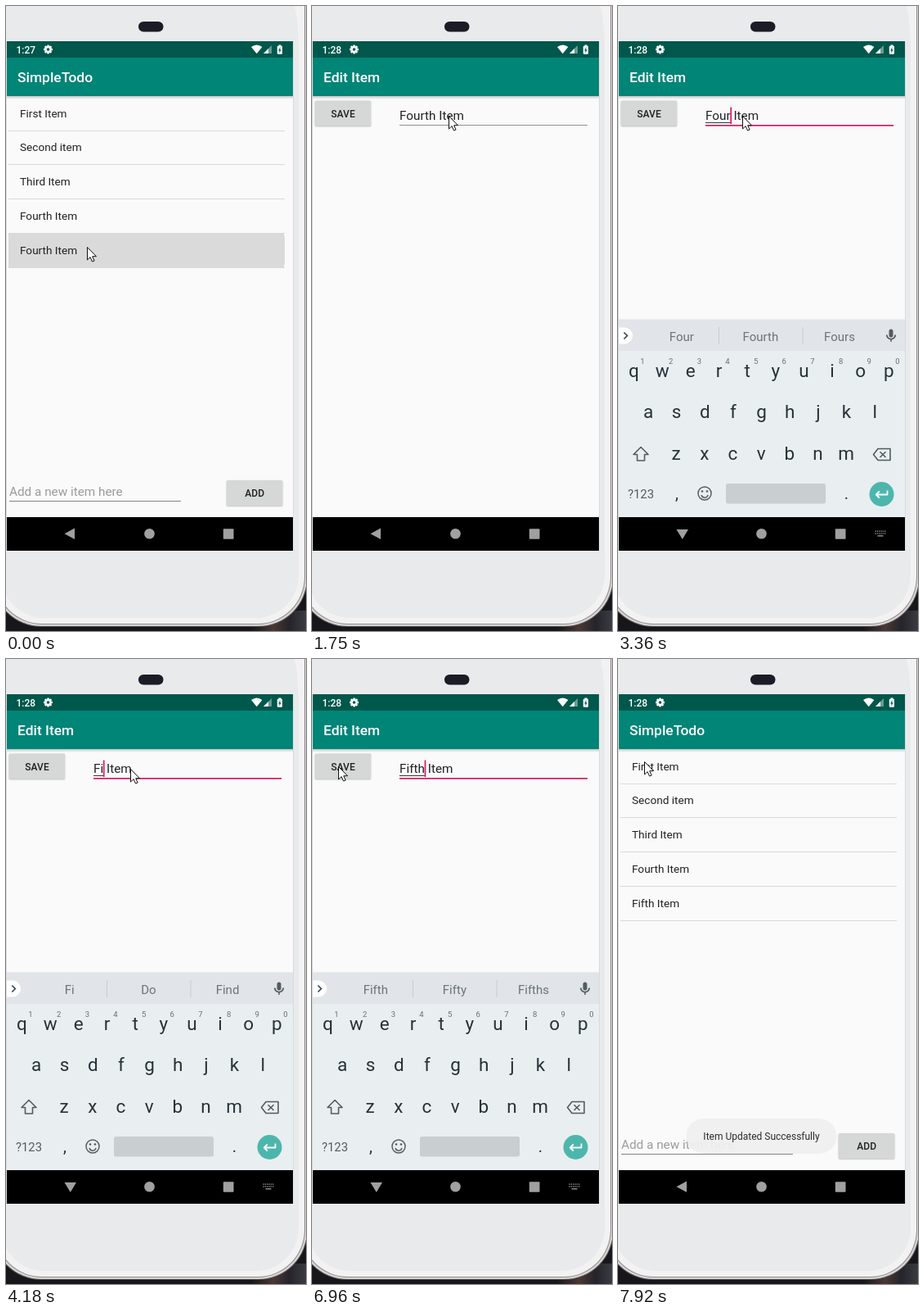
An HTML page with a canvas for the animation above (8 s loop, 367x763 px).

```html
<!DOCTYPE html>
<html lang="en">
<head>
<meta charset="utf-8">
<title>Todo app demo</title>
<style>
html, body { margin: 0; width: 100%; height: 100%; overflow: hidden; background: #e9eaec; }
canvas { display: block; width: 367px; height: 763px; }
</style>
</head>
<body>
<canvas id="stage"></canvas>
<script>
const W = 367, H = 763, LOOP = 8000;
const canvas = document.getElementById('stage');
const ratio = window.devicePixelRatio || 1;
canvas.width = Math.round(W * ratio);
canvas.height = Math.round(H * ratio);
const ctx = canvas.getContext('2d');
ctx.scale(ratio, ratio);

const PINK = '#d81b60';

// Each track is a list of [start, ...values]; a value holds until the next start.
const pointerTrack = [
  [0, 99.5, 294], [1500, 126, 235], [1630, 155, 166], [1750, 167.5, 134], [1900, 155, 134],
  [2050, 152.5, 134], [5310, 137, 139], [5430, 106, 140], [5550, 70, 138], [5680, 42, 134],
  [5800, 32.5, 131], [7920, 32.5, 125]
];
// entering offset, top of the revealed part, shift of the list, dimming
const openTrack = [
  [0, 25, 700, 0, 0], [700, 25, 560, 0, .02], [820, 24, 420, -1, .04],
  [960, 12, 120, -8, .1], [1080, 1, 43, -8, .1], [1230, 0, 43, -8, .1]
];
const closeTrack = [[7230, -8, .1], [7380, -3, .04], [7500, 0, 0]];
// offset, opacity
const keyboardTrack = [[0, 0, 0], [2850, 27, .5], [2980, 7, .85], [3120, 0, 1], [7380, 34, .4], [7500, 0, 0]];
const wordTrack = [
  [0, 'Fourth', 'Fourths', 'Fourth-quarter'], [3240, 'Fourt', 'Fourth', 'Fourths'],
  [3360, 'Four', 'Fourth', 'Fours'], [3510, 'Fou', 'Four', 'Foul'], [3630, 'Fo', 'For', 'Food'],
  [3760, 'F', 'For', 'Fun'], [4180, 'Fi', 'Do', 'Find'], [4300, 'Fif', 'Fifth', 'Fit'],
  [4730, 'Fifth', 'Fifty', 'Fifths']
];

function at(track, t) {
  let current = track[0];
  for (const entry of track) if (entry[0] <= t) current = entry;
  return current.slice(1);
}

function rect(x, y, w, h, color) {
  ctx.fillStyle = color;
  ctx.fillRect(x, y, w, h);
}

function round(x, y, w, h, r, color) {
  ctx.fillStyle = color;
  ctx.beginPath();
  ctx.roundRect(x, y, w, h, r);
  ctx.fill();
}

function disc(x, y, r, color) {
  ctx.fillStyle = color;
  ctx.beginPath();
  ctx.arc(x, y, r, 0, Math.PI * 2);
  ctx.fill();
}

function trace(points, closed) {
  ctx.beginPath();
  points.forEach(([x, y]) => ctx.lineTo(x, y));
  if (closed) ctx.closePath();
}

function poly(points, color) {
  trace(points, true);
  ctx.fillStyle = color;
  ctx.fill();
}

function line(points, color, width = 1, closed = false) {
  trace(points, closed);
  ctx.strokeStyle = color;
  ctx.lineWidth = width;
  ctx.stroke();
}

function text(str, x, y, size, color, weight = 400, align = 'left') {
  ctx.font = `${weight} ${size}px Roboto, sans-serif`;
  ctx.textAlign = align;
  ctx.fillStyle = color;
  ctx.fillText(str, x, y);
}

function layer(draw) {
  ctx.save();
  draw();
  ctx.restore();
}

function clip(x, y, w, h) {
  ctx.beginPath();
  ctx.rect(x, y, w, h);
  ctx.clip();
}

function phone() {
  rect(0, 0, W, H, '#17171b');
  const glow = ctx.createLinearGradient(300, 0, W, 0);
  glow.addColorStop(0, '#17171b');
  glow.addColorStop(.4, '#4a3735');
  glow.addColorStop(.7, '#25242a');
  glow.addColorStop(1, '#3a3c42');
  rect(300, 738, 67, 25, glow);
  const rings = [[0, '#514c4d'], [1, '#d8d5d5'], [3, '#938e8f'], [4, '#f3f2f2'], [11, '#e9eaec']];
  for (const [inset, color] of rings) {
    round(-17 + inset, -80, 386 - inset * 2, 838 - inset, 60 - inset * .7, color);
  }
  ctx.fillStyle = '#f3f2f2';
  ctx.beginPath();
  ctx.moveTo(353, 0);
  ctx.quadraticCurveTo(357, 16, 358, 48);
  ctx.lineTo(360, 48);
  ctx.lineTo(360, 0);
  ctx.fill();
  round(162, 19, 30.5, 12.5, 6.2, '#1b1d26');
  rect(0, 43, 352, 622, '#d9dbdc');
}

function toolbar(title) {
  rect(1, 43, 350, 20, '#00574b');
  rect(1, 63, 350, 47, '#008577');
  const shade = ctx.createLinearGradient(0, 110, 0, 114);
  shade.addColorStop(0, 'rgba(0,0,0,.2)');
  shade.addColorStop(1, 'rgba(0,0,0,0)');
  rect(1, 110, 350, 4, shade);
  text(title, 14, 93, 17.4, '#fff', 500);
}

function button(label, x, y) {
  layer(() => {
    ctx.shadowColor = 'rgba(0,0,0,.25)';
    ctx.shadowBlur = 1.5 * ratio;
    ctx.shadowOffsetY = .7 * ratio;
    round(x, y, 68.5, 31, 1.5, '#d6d7d7');
  });
  text(label, x + 34.4, y + 20, 12, '#202020', 500, 'center');
}

function listScreen(lastItem, { shift = 0, dim = 0, pressed = false, resized = false }) {
  layer(() => {
    clip(1, 43, 350, 581);
    rect(1, 43, 350, 581, '#fafafa');
    ctx.translate(0, shift);
    toolbar('SimpleTodo');
    if (pressed) {
      rect(3, 278, 337, 41, '#dadada');
      round(330, 278, 11, 41, 5, '#dadada');
    }
    ['First Item', 'Second item', 'Third Item', 'Fourth Item', lastItem].forEach((item, i) => {
      const bottom = Math.round(151.6 + i * 41.8);
      text(item, 17, bottom - 16, 13.6, '#222');
      rect(3, bottom, 338, 1, '#d9d9d9');
    });
    const inputY = resized ? -240 : 0;
    text('Add a new item here', 4, 598 + inputY, 15.3, '#9b9b9b');
    rect(4, 604 + inputY, 210, 1, '#858585');
    button('ADD', 269.8, 579 + inputY);
    ctx.translate(0, -shift);
    rect(1, 43, 350, 581, `rgba(0,0,0,${dim})`);
  });
}

function editScreen(t, offset, top) {
  const focused = t >= 2300;
  layer(() => {
    clip(1, Math.max(43, top), 350, 622);
    ctx.translate(0, offset);
    rect(1, 43, 350, 581, '#fafafa');
    toolbar('Edit Item');
    button('SAVE', 3.6, 115.5);
    const [word] = at(wordTrack, t);
    text(word + ' Item', 107, 139, 15.3, '#222');
    const end = 107 + ctx.measureText(word).width;
    rect(107, 145, 230, focused ? 1.7 : .9, focused ? PINK : '#858585');
    if (t >= 2570) {
      rect(107, 142, end - 107, 1, '#333');
      rect(end - .3, 123.5, 1.7, 20.5, PINK);
    }
    if (t >= 2570 && t < 3240) {
      disc(end, 155, 8.5, PINK);
      poly([[end, 146], [end + 6, 149], [end - 6, 149]], PINK);
    }
  });
}

function statusBar(clock) {
  text(clock, 12.5, 57.5, 12, '#fff', 500);
  ctx.save();
  ctx.translate(51.5, 53);
  for (let i = 0; i < 4; i++) {
    rect(-1.3, -5.4, 2.6, 10.8, '#fff');
    ctx.rotate(Math.PI / 4);
  }
  disc(0, 0, 4.2, '#fff');
  disc(0, 0, 1.8, '#00574b');
  ctx.restore();
  ctx.fillStyle = '#fff';
  ctx.beginPath();
  ctx.moveTo(306.7, 58.2);
  ctx.lineTo(300, 50);
  ctx.quadraticCurveTo(306.7, 45, 313.4, 50);
  ctx.fill();
  poly([[315, 58], [325, 58], [325, 48]], '#6b9b94');
  poly([[315, 58], [321, 58], [321, 52]], '#fff');
  rect(333.5, 47.5, 3, 2, '#fff');
  round(331.8, 48.8, 6.2, 10, 1, '#fff');
  poly([[335.5, 50], [333.2, 54.4], [334.6, 54.4], [334.2, 57.5], [336.7, 53.2], [335.2, 53.2]], '#00574b');
}

function navBar(typing) {
  const gray = '#a0a0a0';
  if (typing) {
    poly([[71.5, 639], [86, 639], [78.8, 651]], gray);
    for (let row = 0; row < 2; row++) {
      for (let col = 0; col < 6; col++) rect(314.5 + col * 2.3, 640.5 + row * 2.8, 1.2, 1.4, gray);
    }
    rect(317.5, 646.2, 7, 1.3, gray);
  } else {
    poly([[71.5, 644.3], [84, 637.5], [84, 651]], gray);
  }
  disc(175.5, 644.3, 6.3, gray);
  round(265.8, 638.2, 12.7, 12.5, 1, gray);
}

function keyRow(letters, x, y) {
  [...letters].forEach((letter, i) => text(letter, x + i * 34.65, y, 22.5, '#263238', 400, 'center'));
}

function keyIcons() {
  const gray = '#525c61';
  ctx.lineJoin = 'round';
  line([[28, 538.5], [37, 547.5], [32.5, 547.5], [32.5, 555], [23.5, 555], [23.5, 547.5], [19, 547.5]], gray, 1.6, true);
  line([[312.5, 547.5], [318, 540.5], [333, 540.5], [333, 554.5], [318, 554.5]], gray, 1.6, true);
  line([[320.5, 544.2], [327.5, 551]], gray, 1.6);
  line([[327.5, 544.2], [320.5, 551]], gray, 1.6);

  ctx.strokeStyle = gray;
  ctx.lineWidth = 1.5;
  ctx.beginPath();
  ctx.arc(106, 595, 8, 0, Math.PI * 2);
  ctx.stroke();
  ctx.beginPath();
  ctx.arc(106, 596, 4.2, .25, Math.PI - .25);
  ctx.stroke();
  disc(103, 592.5, 1.3, gray);
  disc(109, 592.5, 1.3, gray);

  disc(322.5, 596, 15, '#4db6ac');
  line([[329.5, 591.5], [329.5, 596.5], [316, 596.5]], '#fff', 1.8);
  line([[319.8, 592.5], [315.8, 596.5], [319.8, 600.5]], '#fff', 1.8);

  round(331.5, 394.5, 5, 10, 2.5, gray);
  ctx.strokeStyle = gray;
  ctx.beginPath();
  ctx.arc(334, 401.5, 5.2, 0, Math.PI);
  ctx.stroke();
  line([[334, 406.5], [334, 410]], gray, 1.5);
}

function keyboard(t) {
  const [offset, opacity] = at(keyboardTrack, t);
  if (!opacity) return;
  layer(() => {
    clip(1, 43, 350, 621);
    ctx.translate(0, offset);
    ctx.globalAlpha = opacity;
    rect(1, 382, 350, 1, '#eceeef');
    rect(1, 383, 350, 38, '#e1e5e9');
    rect(1, 421, 350, 203, '#e9eef1');
    round(-9, 392.5, 27, 20, 10, '#fff');
    line([[7.3, 398.5], [11.3, 402.5], [7.3, 406.5]], '#3c4448', 1.7);
    at(wordTrack, t).forEach((word, i) => {
      text(word, 77.8 + i * 96.6, 408.5, word.length > 10 ? 12.4 : 15, '#6b7478', 400, 'center');
    });
    rect(123, 392, 1, 21, '#c8cdd0');
    rect(225.5, 392, 1, 21, '#c8cdd0');

    keyRow('qwertyuiop', 19.5, 453);
    [...'1234567890'].forEach((digit, i) => text(digit, 30 + i * 34.65, 437, 9.5, '#667075', 400, 'center'));
    keyRow('asdfghjkl', 37, 503);
    keyRow('zxcvbnm', 71.2, 553.5);
    text('?123', 28, 600.5, 14.8, '#525c61', 400, 'center');
    text(',', 72, 602, 20, '#263238', 400, 'center');
    text('.', 279.5, 602, 20, '#263238', 400, 'center');
    round(132, 583, 122, 24.5, 2.5, '#c9ced1');
    keyIcons();
  });
}

function toast() {
  round(83.5, 561, 184, 43, 21.5, 'rgba(240,240,240,.94)');
  text('Item Updated Successfully', 175.5, 587.3, 12, '#2b2b2b', 400, 'center');
}

function pointer(x, y) {
  layer(() => {
    ctx.translate(x, y);
    ctx.lineJoin = 'miter';
    const arrow = [[0, .5], [0, 16], [3.6, 12.6], [6, 18], [8.6, 17], [6.2, 11.7], [11, 11.7]];
    poly(arrow, '#fff');
    line(arrow, '#111', 1, true);
  });
}

function draw(t) {
  ctx.clearRect(0, 0, W, H);
  phone();
  rect(1, 624, 350, 41, '#000');
  const typing = t >= 2850 && t < 7230;
  navBar(typing);
  if (t < 7230) {
    const [offset, top, shift, dim] = at(openTrack, t);
    if (t < 1080) listScreen('Fourth Item', { shift, dim, pressed: true });
    if (t >= 700) editScreen(t, offset, top);
  } else {
    const [shift, dim] = at(closeTrack, t);
    listScreen('Fifth Item', { shift, dim, resized: t < 7380 });
  }
  statusBar(t < 1230 ? '1:27' : '1:28');
  keyboard(t);
  if (t >= 7500) toast();
  pointer(...at(pointerTrack, t));
}

function tick() {
  draw(performance.now() % LOOP);
  requestAnimationFrame(tick);
}
tick();
</script>
</body>
</html>
```
